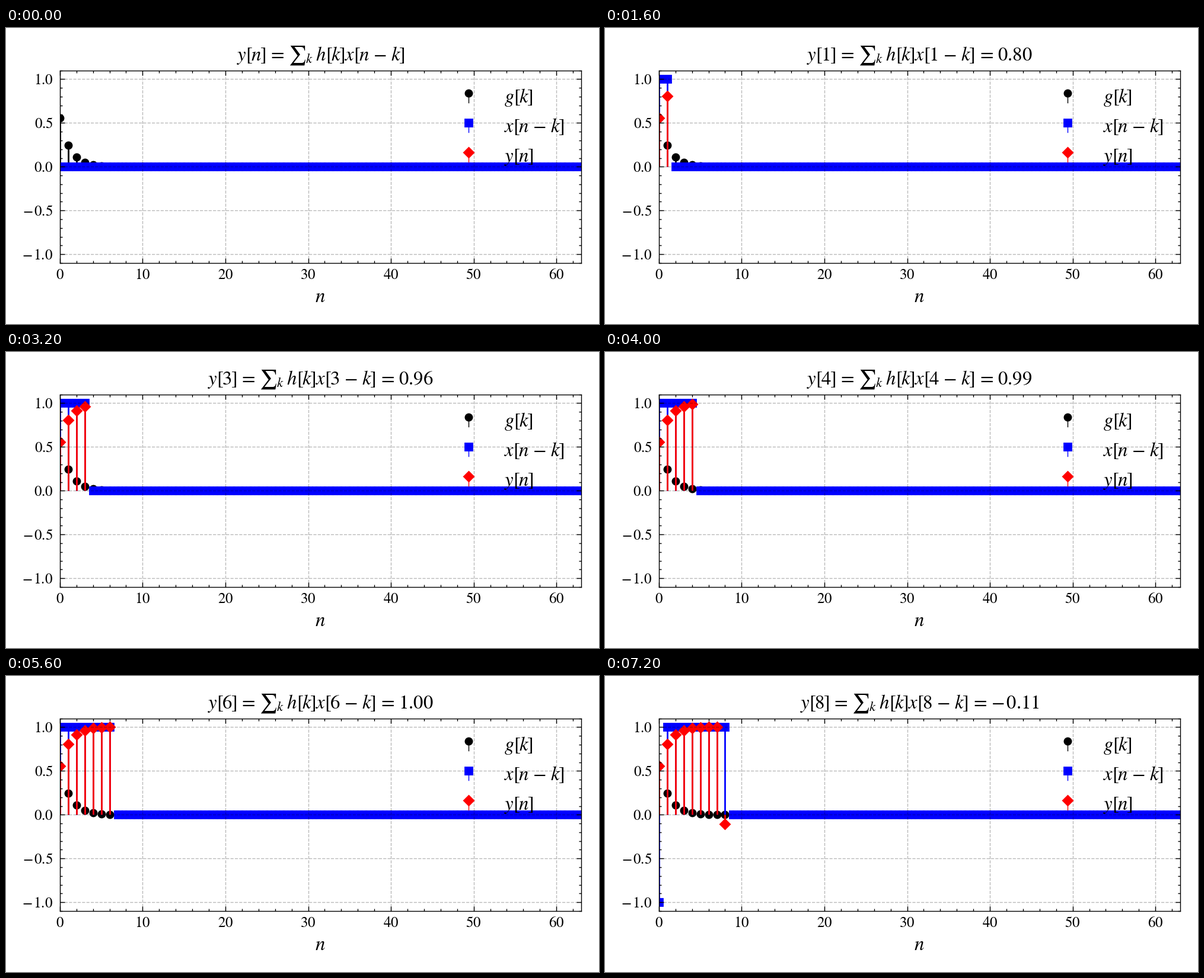
A matplotlib script that plays this animation: 1000x500 px, repeating every 8 s.

```python
import numpy as np
import matplotlib.pyplot as plt
from matplotlib.animation import FuncAnimation
from matplotlib.lines import Line2D
from matplotlib.ticker import MultipleLocator

W, H, DPI = 1000, 500, 200
FRAMES, INTERVAL = 10, 800
LEFT, RIGHT, TOP, BOTTOM = 90.85, 970.05, 71.6, 397
MATH_SIZE, TICK_SIZE = 11.8, 9

plt.rcParams.update({
    "font.family": "Liberation Serif",
    "mathtext.fontset": "stix",
    "axes.linewidth": 0.5,
    "lines.markersize": 4,
    "lines.markeredgewidth": 1,
})

# Impulse response of a first-order low-pass and a square wave input
N = 64
k = np.arange(N)
h = 0.5549 * 0.4477 ** k
x = np.where(k // 8 % 2 == 0, 1.0, -1.0)
y = np.convolve(h, x)[:N]


def math(text):
    """Mathtext with the wider operators and narrower brackets of TeX."""
    for mark, spaced in (("[", r"[\hspace{-0.076}"),
                         ("]", r"\hspace{-0.076}]"),
                         ("=", r"\hspace{0.125}=\hspace{0.125}"),
                         (" - ", r"\hspace{0.13}-\hspace{0.13}"),
                         ("~", r"{-}\hspace{0.13}")):
        text = text.replace(mark, spaced)
    return f"${text}$"


def number(value, digits):
    return f"{value:.{digits}f}".replace("-", "~")


fig = plt.figure(figsize=(W / DPI, H / DPI), dpi=DPI, facecolor="white")
ax = fig.add_axes([LEFT / W, 1 - BOTTOM / H,
                   (RIGHT - LEFT) / W, (BOTTOM - TOP) / H])


def label(px, py, text, size=MATH_SIZE, ha="center"):
    return fig.text(px / W, 1 - py / H, math(text), fontsize=size,
                    ha=ha, va="baseline", color="black", zorder=5)


# Axes and ticks, with a translucent grid above the data
for axis, major, minor in ((ax.xaxis, 10, 2), (ax.yaxis, 0.5, 0.1)):
    axis.set_major_locator(MultipleLocator(major))
    axis.set_minor_locator(MultipleLocator(minor))
ax.tick_params(which="both", direction="in", width=0.5, top=True, right=True,
               labelbottom=False, labelleft=False)
ax.tick_params(which="major", length=3)
ax.tick_params(which="minor", length=1.5)
ax.grid(True, linestyle="--", linewidth=0.5, color="black", alpha=0.27)
ax.set_axisbelow(False)

for tick in range(0, 61, 10):
    label(LEFT + tick / 63 * (RIGHT - LEFT), 424, str(tick), TICK_SIZE)
for tick in np.arange(-1, 1.1, 0.5):
    center = (TOP + BOTTOM) / 2 - tick / 2.2 * (BOTTOM - TOP)
    label(79.5, center + 8.4, number(tick, 1), TICK_SIZE, "right")
label(530.2, 463, "n")
title = label(530.5, 55, "y")


# Stems, stacked in drawing order, with their legend entries
class Stem:
    def __init__(self, color, marker):
        self.lines = ax.vlines([], 0, [], color=color, linewidth=1)
        self.heads, = ax.plot([], [], color=color, marker=marker,
                              linestyle="none")

    def set(self, values):
        self.lines.set_segments([[(i, 0), (i, v)]
                                 for i, v in enumerate(values)])
        self.heads.set_data(np.arange(len(values)), values)


def legend_row(base, color, marker, text):
    px = 779.8 / W
    foot, head = 1 - base / H, 1 - (base - 16) / H
    style = dict(color=color, transform=fig.transFigure, zorder=5)
    fig.add_artist(Line2D([px, px], [foot, head], linewidth=0.5, **style))
    fig.add_artist(Line2D([px], [head], marker=marker, linestyle="none",
                          **style))
    label(839.6, base, text, ha="left")


stems = []
for row, entry in enumerate((("black", "o", "g[k]"),
                             ("blue", "s", "x[n - k]"),
                             ("red", "D", "y[n]"))):
    stems.append(Stem(*entry[:2]))
    legend_row(126 + 50 * row, *entry)
impulse, signal, output = stems
impulse.set(h)
ax.set_xlim(0, 63)
ax.set_ylim(-1.1, 1.1)


def update(frame):
    n = frame - 1
    reversed_x = np.zeros(N)
    reversed_x[:n + 1] = x[:n + 1][::-1]
    signal.set(reversed_x)
    output.set(y[:n + 1])

    name = "n" if n < 0 else str(n)
    text = (rf"y[{name}]={{\sum}}_{{\hspace{{-0.12}}k}}\hspace{{0.25}}"
            rf"h[k]x[{name} - k]")
    if n >= 0:
        text += "=" + number(y[n], 2)
    title.set_text(math(text))
    return [title]


anim = FuncAnimation(fig, update, frames=FRAMES, interval=INTERVAL,
                     repeat=True, repeat_delay=0, blit=False)
plt.show()
```
